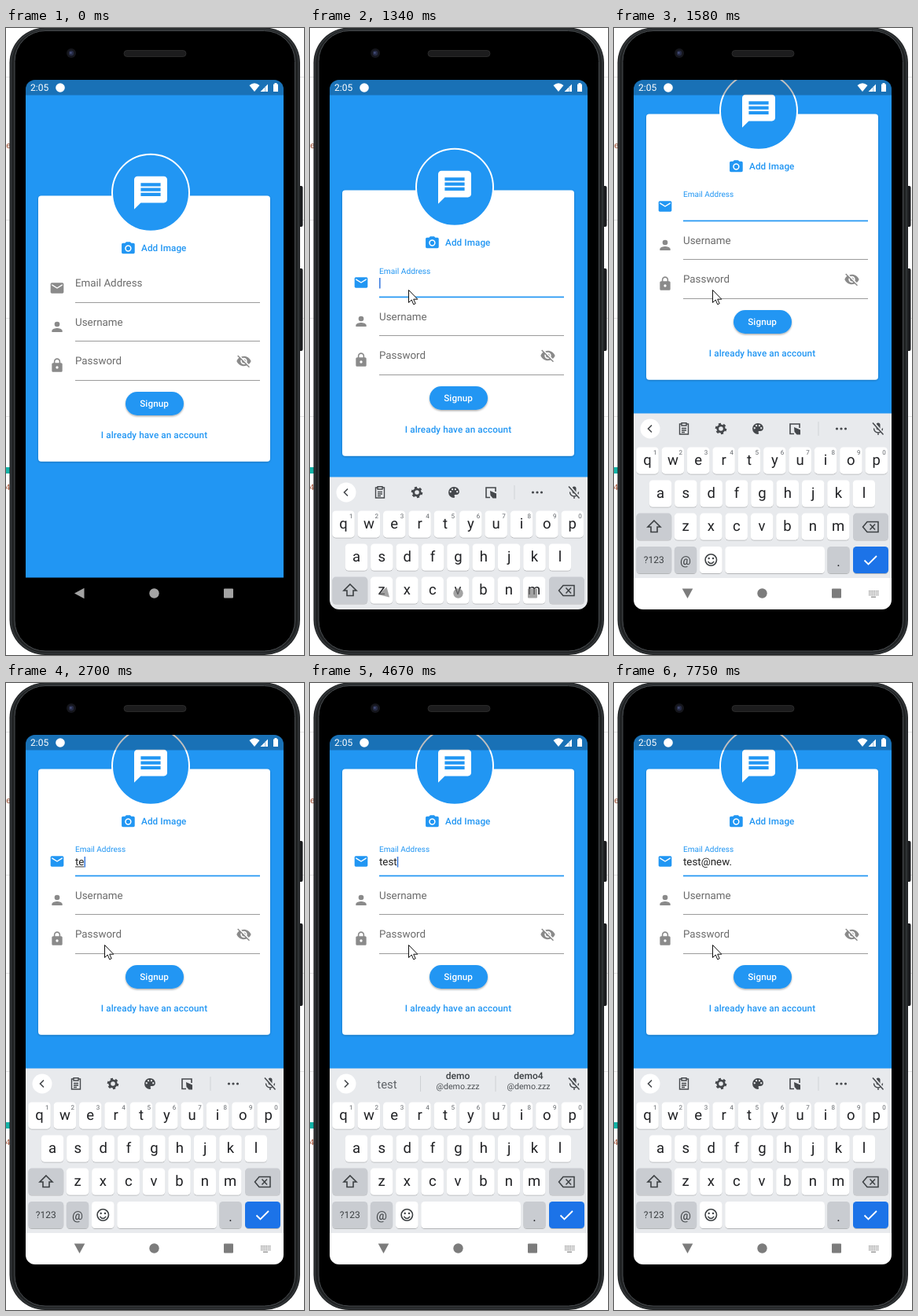
Recreate the animation shown at these times as an HTML page. Size 379x798 px, loop 8000 ms.

```html
<!DOCTYPE html>
<html lang="en">
<head>
<meta charset="utf-8">
<title>Signup form</title>
<style>
html, body { margin: 0; width: 100%; height: 100%; overflow: hidden; background: #fff; }
svg { display: block; width: 379px; height: 798px; text-rendering: geometricPrecision; font-family: Roboto, sans-serif; }
.mid { text-anchor: middle; }
.btn { font-size: 11.7px; font-weight: 500; letter-spacing: .1px; }
.field { font-size: 13.36px; }
</style>
</head>
<body>
<svg id="stage" viewBox="0 0 379 798" xmlns="http://www.w3.org/2000/svg"></svg>
<script>
const BLUE = '#2196f3', GREY = '#8a8a8a', HINT = '#6a6a6a', INK = '#202124', TOOL = '#45484c';
const $ = id => document.getElementById(id);

const PATHS = {
  message: 'M20 2H4c-1.1 0-1.99.9-1.99 2L2 22l4-4h14c1.1 0 2-.9 2-2V4c0-1.1-.9-2-2-2zm-2 12H6v-2h12v2zm0-3H6V9h12v2zm0-3H6V6h12v2z',
  camera: 'M9 2L7.17 4H4c-1.1 0-2 .9-2 2v12c0 1.1.9 2 2 2h16c1.1 0 2-.9 2-2V6c0-1.1-.9-2-2-2h-3.17L15 2H9zm3 15a5 5 0 1 1 0-10 5 5 0 0 1 0 10zM12 8.8a3.2 3.2 0 1 0 0 6.4 3.2 3.2 0 0 0 0-6.4z',
  mail: 'M20 4H4c-1.1 0-2 .9-2 2v12c0 1.1.9 2 2 2h16c1.1 0 2-.9 2-2V6c0-1.1-.9-2-2-2zm0 4l-8 5-8-5V6l8 5 8-5v2z',
  person: 'M12 12a4 4 0 1 0 0-8 4 4 0 0 0 0 8zm0 2c-2.67 0-8 1.34-8 4v2h16v-2c0-2.66-5.33-4-8-4z',
  lock: 'M18 8h-1V6A5 5 0 0 0 7 6v2H6c-1.1 0-2 .9-2 2v10c0 1.1.9 2 2 2h12c1.1 0 2-.9 2-2V10c0-1.1-.9-2-2-2zm-6 9a2 2 0 1 1 0-4 2 2 0 0 1 0 4zm3.1-9H8.9V6a3.1 3.1 0 0 1 6.2 0v2z',
  hidden: 'M12 7c2.76 0 5 2.24 5 5 0 .65-.13 1.26-.36 1.83l2.92 2.92c1.51-1.26 2.7-2.89 3.43-4.75-1.73-4.39-6-7.5-11-7.5-1.4 0-2.74.25-3.98.7l2.16 2.16C10.74 7.13 11.35 7 12 7zM2 4.27l2.74 2.74C3.08 8.3 1.78 10.02 1 12c1.73 4.39 6 7.5 11 7.5 1.55 0 3.03-.3 4.38-.84L19.73 22 21 20.73 3.27 3 2 4.27zM7.53 9.8l1.55 1.55c-.05.21-.08.43-.08.65 0 1.66 1.34 3 3 3 .22 0 .44-.03.65-.08l1.55 1.55c-.67.33-1.41.53-2.2.53-2.76 0-5-2.24-5-5 0-.79.2-1.53.53-2.2zm4.31-.78l3.15 3.15.02-.16c0-1.66-1.34-3-3-3l-.17.01z',
  palette: 'M12 3a9 9 0 1 0 0 18c.83 0 1.5-.67 1.5-1.5 0-.39-.15-.74-.39-1.01-.23-.26-.38-.61-.38-.99 0-.83.67-1.5 1.5-1.5H16c2.76 0 5-2.24 5-5 0-4.42-4.03-8-9-8zM6.5 9.5a1.5 1.5 0 1 0 0 3 1.5 1.5 0 0 0 0-3zm3-4a1.5 1.5 0 1 0 0 3 1.5 1.5 0 0 0 0-3zm5 0a1.5 1.5 0 1 0 0 3 1.5 1.5 0 0 0 0-3zm3 4a1.5 1.5 0 1 0 0 3 1.5 1.5 0 0 0 0-3z'
};

const rect = (x, y, w, h, fill, rx = 0, more = '') =>
  `<rect x="${x}" y="${y}" width="${w}" height="${h}" rx="${rx}" fill="${fill}" ${more}/>`;
const dot = (x, y, r, fill, more = '') => `<circle cx="${x}" cy="${y}" r="${r}" fill="${fill}" ${more}/>`;
const line = (d, color, w = 1.5, more = '') => `<path d="${d}" fill="none" stroke="${color}" stroke-width="${w}" ${more}/>`;
const text = (x, y, s, fill, more = '') => `<text x="${x}" y="${y}" fill="${fill}" ${more}>${s}</text>`;
const icon = (name, x, y, size, fill) =>
  `<path id="${name}" d="${PATHS[name]}" fill="${fill}" fill-rule="evenodd" transform="translate(${x - size / 2} ${y - size / 2}) scale(${size / 24})"/>`;

function phone() {
  const lines = [62, 244, 369, 494].map(y => rect(0, y, 379, 1, '#e6e6e6')).join('');
  return lines +
    text(0, 153, 'e', '#9a4a2c', 'font-size="11" font-family="Liberation Mono, monospace"') +
    rect(0, 559, 6, 8, '#12b3a6') +
    text(-1, 588, '4', '#a5563a', 'font-size="11" font-family="Liberation Mono, monospace"') +
    rect(371, 201, 6.5, 52, '#1b1c1e', 2) + rect(371, 306, 6.5, 105, '#1b1c1e', 2) +
    rect(4.5, -.5, 369.5, 798.5, '#202223', 45) +
    rect(6.5, 1.5, 365.5, 794.5, 'none', 43, 'stroke="#33373a" stroke-width="1.500"') +
    rect(11, 3.5, 356.5, 789.5, '#000', 39, 'stroke="#4a4e52" stroke-width="1"') +
    rect(150, 28.5, 79, 8, '#1c1c1d', 4, 'stroke="#303030" stroke-width=".8"') +
    dot(83, 32, 6, '#15161c') + dot(83, 32, 3.2, '#262b45') + dot(82.4, 31.6, 1.2, '#4c5685');
}

function form() {
  const rule = y => rect(88, y, 235, 1, '#9b9b9b');
  return rect(41, 213.5, 295, 338.2, '#fff', 4, 'filter="url(#soft)"') +
    dot(184, 209.8, 49, BLUE, 'stroke="#fff" stroke-width="2"') +
    icon('message', 184, 209.8, 50.4, '#fff') +
    icon('camera', 155.4, 280.5, 20, BLUE) +
    text(172, 284.4, 'Add Image', BLUE, 'class="btn"') +
    icon('mail', 65, 331, 20, GREY) + icon('person', 65, 380.3, 20, GREY) + icon('lock', 65, 429.5, 20, GREY) +
    `<text id="label" class="field">Email Address</text>` +
    text(88, 379, 'Username', HINT, 'class="field"') +
    text(88, 428.1, 'Password', HINT, 'class="field"') +
    icon('hidden', 302.5, 424, 20, GREY) +
    `<rect id="rule" x="88" width="235"/>` + rule(398) + rule(448) +
    `<text id="entry" class="field" x="88" y="335.800" fill="#222"></text>` +
    rect(88, 337.4, 0, 1, '#333', 0, 'id="composing"') +
    rect(88, 325, 1.6, 13.5, '#3f7fe0', 0, 'id="caret"') +
    rect(152, 463, 74, 30, BLUE, 15, 'filter="url(#lift)"') +
    text(188.6, 482.3, 'Signup', '#fff', 'class="btn mid"') +
    text(188.5, 522.2, 'I already have an account', BLUE, 'class="btn mid"');
}

function status() {
  return rect(25, 66, 328, 19.5, '#000', 0, 'opacity=".25"') +
    text(31, 80.3, '2:05', '#fff', 'font-size="12"') +
    dot(69, 76, 5.8, '#fff') +
    '<path d="M309.5 73Q316 67.500 322.500 73L316 81ZM323.500 81H333V71.500ZM340 71.500H341.500V70H344.500V71.500H346V81H340Z" fill="#fff"/>' +
    line('M329.700 74V81', '#6aa5d2', .8);
}

// Keyboard is drawn at its resting place.
const KEY = '#fff', DARK = '#c9ccd1';
const key = (x, y, w, fill) => rect(x, y, w, 34, fill, 4.5, 'filter="url(#edge)"');

function letters(chars, first, y, digits) {
  return [...chars].map((c, i) => {
    const x = first + i * 32.36;
    return key(x - 14.2, y, 28.4, KEY) + text(x, y + 22.2, c, INK, 'class="mid" font-size="18.500"') +
      (digits ? text(x + 9.8, y + 9.2, (i + 1) % 10, '#5f6368', 'class="mid" font-size="8"') : '');
  }).join('');
}

function tools() {
  const dots = [-5.5, 0, 5.5].map(d => dot(289 + d, 510, 1.6, TOOL)).join('');
  return line('M86 504H83.500V517H94.500V504H92M86 502.700H92V506H86ZM86 509.500H92M86 512H92M86 514.500H90', TOOL, 1.4) +
    dot(136, 510, 4.2, 'none', `stroke="${TOOL}" stroke-width="2.800"`) +
    dot(136, 510, 6.2, 'none', `stroke="${TOOL}" stroke-width="2.200" pathLength="12" stroke-dasharray="1 1"`) +
    icon('palette', 183, 510, 18.5, TOOL) +
    line('M229 516.500H224V504H236V509', TOOL, 1.6) +
    `<path d="M229 508L237 511.500V517.500H232.500L229.500 514Z" fill="${TOOL}"/>` +
    rect(259.5, 501, 1, 18, '#d0d3d7') + dots;
}

function suggestions() {
  const pair = (x, name, host) =>
    text(x, 503.6, name, '#3c4043', 'class="mid" font-size="12" font-weight="500"') +
    text(x, 517.4, host, '#4b4f53', 'class="mid" font-size="10.600"');
  return `<text id="chip" class="mid" x="98" y="515.500" font-size="15" fill="#5f6368"></text>` +
    rect(140, 500, 1, 20, '#cdd0d4') + rect(235.5, 500, 1, 20, '#cdd0d4') +
    pair(188, 'demo', '@demo.zzz') + pair(278, 'demo4', '@demo.zzz');
}

function keyboard() {
  return rect(25, 490.5, 328, 210, '#e8eaed') + rect(25, 700, 328, 140, '#fff') +
    dot(46, 510, 12.5, '#fff') + `<path id="arrow" fill="none" stroke="${TOOL}" stroke-width="1.600"/>` +
    `<g id="tools">${tools()}</g><g id="chips">${suggestions()}</g>` +
    rect(333.5, 502.5, 5, 9, TOOL, 2.5) +
    line('M330.500 509.500a5.500 5.500 0 0 0 11 0M336 515V518', TOOL, 1.4) +
    line('M330 502L343 517', '#e8eaed', 3) + line('M329 502.500L342.500 517.500', TOOL, 1.5) +
    letters('qwertyuiop', 42.5, 533.4, true) + letters('asdfghjkl', 59, 575.5) + letters('zxcvbnm', 91, 617.6) +
    key(28.3, 617.6, 45, DARK) + line('M51 627L59 635H55V641.500H47V635H43Z', '#3c4043', 1.6) +
    key(304, 617.6, 45, DARK) + line('M322 628.500H336V641.500H322L316.500 635ZM325.500 631.500L332 638.500M332 631.500L325.500 638.500', '#3c4043', 1.5) +
    key(28.3, 660, 45, DARK) + text(50.7, 681.4, '?123', '#3c4043', 'class="mid" font-size="12"') +
    key(76.8, 660, 28.4, DARK) + text(91, 682.5, '@', '#3c4043', 'class="mid" font-size="15.500"') +
    key(109, 660, 28.6, KEY) + dot(123.3, 677, 7.2, 'none', 'stroke="#3c4043" stroke-width="1.600"') +
    dot(120.7, 675, 1.2, '#3c4043') + dot(126, 675, 1.2, '#3c4043') + line('M119.500 679Q123.300 684 127.100 679', '#3c4043') +
    key(141.3, 660, 126.7, KEY) +
    key(271.3, 660, 28.5, DARK) + text(285.5, 684.5, '.', INK, 'class="mid" font-size="17"') +
    key(304, 660, 45, '#1a73e8') + line('M318.500 677.500L323.500 682.500L334 672', '#fff', 1.8);
}

function nav() {
  let caps = '';
  for (let r = 0; r < 3; r++)
    for (let c = 0; c < 6; c++) caps += rect(324 + c * 2.2, 716 + r * 2.4, 1.4, 1.4, '#8b8b8b');
  caps += rect(327, 723.5, 6, 1.3, '#8b8b8b');
  return `<g id="buttons"><path id="back" d="M87 719.500L99.500 712.700V726.300Z"/>` +
    `<circle cx="188.500" cy="719.500" r="6.200"/><rect x="277" y="713.500" width="12" height="12" rx="1"/></g>` +
    `<g id="caps">${caps}</g>`;
}

const shadow = (id, dy, blur, alpha) =>
  `<filter id="${id}" x="-20%" y="-20%" width="140%" height="150%"><feDropShadow dx="0" dy="${dy}" stdDeviation="${blur}" flood-opacity="${alpha}"/></filter>`;

$('stage').innerHTML = `<defs>
  <clipPath id="screen"><rect x="25" y="66" width="328" height="674" rx="12"/></clipPath>
  ${shadow('soft', .8, .8, .28)}${shadow('lift', 1.3, 1.1, .35)}${shadow('edge', .9, .3, .25)}
  </defs>${phone()}
  <g clip-path="url(#screen)">${rect(25, 66, 328, 633.5, BLUE)}
  <g id="form">${form()}</g>${status()}<g id="keys">${keyboard()}</g>${nav()}</g>
  <path id="mouse" d="M.5 .5V16.500L4.200 13L6.700 18.800L9.200 17.700L6.700 12.200H11.800Z" fill="#fff" stroke="#111" stroke-width="1"/>`;

// Each step keeps whatever it does not name.
const steps = [
  [0, { up: 0, drop: null, float: 0, typed: '', caret: 0, chip: '', under: 0, turn: 0, mouse: null }],
  [500, { mouse: [15, 354] }], [620, { mouse: [72, 344] }], [730, { mouse: [112, 336] }], [850, { mouse: [125, 333] }],
  [1220, { float: .5, caret: 1 }],
  [1340, { float: .94, up: 7, drop: 81, turn: -15 }],
  [1460, { float: 1, up: 99, drop: 6, turn: -90 }],
  [1580, { up: 104, drop: 0, caret: 0 }],
  [2080, { caret: 1 }],
  [2580, { typed: 't', under: 1 }], [2700, { typed: 'te' }], [2820, { chip: 'te' }],
  [2940, { typed: 'tes' }], [3060, { chip: 'tes' }],
  [3430, { typed: 'test' }], [3680, { chip: 'test', under: 0 }],
  [4170, { caret: 0 }], [4670, { caret: 1 }], [5160, { caret: 0 }],
  [5660, { typed: 'test@', caret: 1 }], [5910, { chip: '' }], [6030, { typed: 'test@n' }],
  [6520, { typed: 'test@ne' }], [6640, { typed: 'test@new' }],
  [7010, { caret: 0 }], [7250, { typed: 'test@new.', caret: 1 }], [7750, { caret: 0 }]
];
const LOOP = 8000;

const stateAt = t => Object.assign({}, ...steps.filter(s => s[0] <= t).map(s => s[1]));
const set = (id, attrs) => { for (const k in attrs) $(id).setAttribute(k, attrs[k]); };
const show = (id, on) => $(id).style.display = on ? '' : 'none';

function draw(t) {
  const s = stateAt(t), focus = s.float > 0, open = s.drop !== null, settled = s.turn === -90;
  set('form', { transform: `translate(0 ${-s.up})` });
  set('label', {
    transform: `translate(88 ${329.2 - 9.8 * s.float}) scale(${1 - .25 * s.float})`,
    fill: focus ? BLUE : HINT
  });
  set('mail', { fill: focus ? BLUE : GREY });
  set('rule', { y: focus ? 348.6 : 349, height: focus ? 1.7 : 1, fill: focus ? BLUE : '#9b9b9b' });

  $('entry').textContent = s.typed;
  const width = s.typed ? $('entry').getComputedTextLength() : 0;
  set('caret', { x: 88 + width });
  show('caret', s.caret);
  set('composing', { width: s.under ? width : 0 });

  show('keys', open);
  set('keys', { transform: `translate(0 ${s.drop || 0})` });
  show('tools', !s.chip);
  show('chips', s.chip);
  $('chip').textContent = s.chip;
  set('arrow', { d: s.chip ? 'M44 505.500L48.500 510L44 514.500' : 'M48 505.500L43.500 510L48 514.500' });

  set('buttons', { fill: open ? '#7c7c7c' : '#a3a3a3', opacity: open && !settled ? .7 : 1 });
  set('back', { transform: `rotate(${s.turn} 93.5 719.5)` });
  show('caps', settled);

  show('mouse', s.mouse);
  if (s.mouse) set('mouse', { transform: `translate(${s.mouse})` });
}

const start = performance.now();
function tick() {
  draw((performance.now() - start) % LOOP);
  requestAnimationFrame(tick);
}
tick();
</script>
</body>
</html>
```
